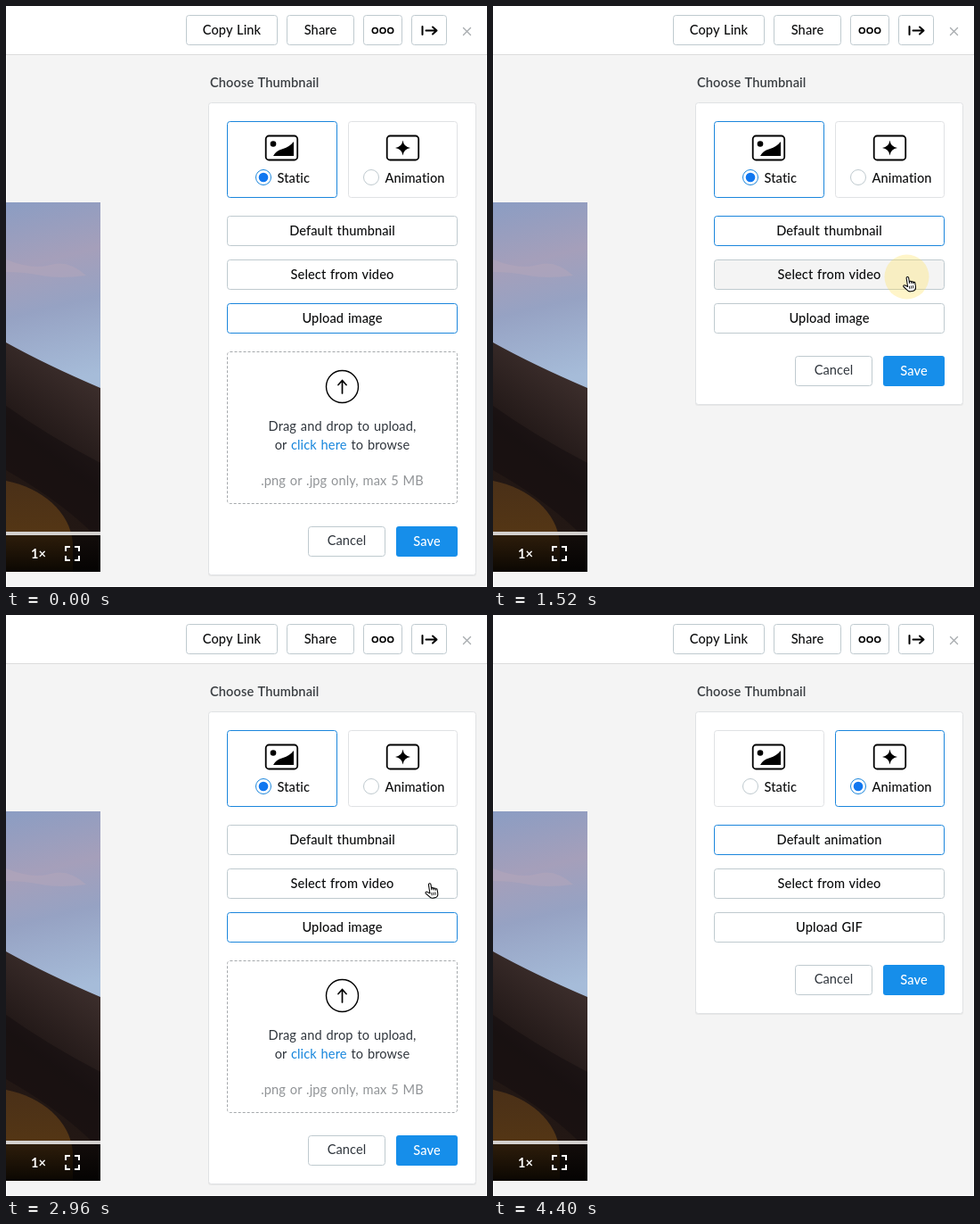
An HTML page for the animation above (4.56 s loop, 540 by 651 pixels).

```html
<!DOCTYPE html>
<html lang="en">
<head>
<meta charset="utf-8">
<style>
  html, body { margin: 0; width: 100%; height: 100%; overflow: hidden; background: #fff; }
  svg { display: block; }
  text { font: 500 14.6px Lato, sans-serif; letter-spacing: .1px; word-spacing: 1px; fill: #0c0d0e; }
  .mid { text-anchor: middle; }
  .body { font-weight: 400; fill: #30363d; }
  .hint { font-weight: 400; fill: #919497; }
  .box { fill: #fff; stroke: #bfcacf; }
  .card { stroke: #e0e2e4; }
  .on { stroke: #1b86dc; }
  .hover { fill: #f4f4f4; }
  .ink { fill: none; stroke: #000; stroke-linecap: round; stroke-linejoin: round; }
</style>
</head>
<body>
<svg width="540" height="651" viewBox="0 0 540 651">
  <defs>
    <linearGradient id="sky" x1="0" y1="0" x2=".12" y2="1">
      <stop offset="0" stop-color="#8b9dc3"/>
      <stop offset=".35" stop-color="#a59fba"/>
      <stop offset=".6" stop-color="#96a2c3"/>
      <stop offset="1" stop-color="#a6bcd9"/>
    </linearGradient>
    <linearGradient id="dune" x1=".3" y1="0" x2="0" y2="1">
      <stop offset="0" stop-color="#3b2d2b"/>
      <stop offset=".4" stop-color="#1f1615"/>
      <stop offset="1" stop-color="#291a12"/>
    </linearGradient>
    <linearGradient id="glow" x1="0" y1="0" x2="0" y2="1">
      <stop offset="0" stop-color="#4a3018"/>
      <stop offset="1" stop-color="#5b3a12"/>
    </linearGradient>
    <linearGradient id="bar" x1="0" y1="0" x2="0" y2="1">
      <stop offset="0" stop-color="#000" stop-opacity=".45"/>
      <stop offset="1" stop-color="#000" stop-opacity=".88"/>
    </linearGradient>
    <clipPath id="screen"><path d="M0 220h106v414H0z"/></clipPath>
    <path id="hand" d="M11 25V4a2.8 2.8 0 0 1 5.6 0v13v-2a2.4 2.4 0 0 1 4.8 0v3v-1.5a2.2 2.2 0 0 1 4.4 0v3v-1a2.1 2.1 0 0 1 4.2 0v9c0 6-4 10-10 10h-4c-4 0-6-2-8-5L1.2 24c-2-3 2-5.5 4.3-3z"/>
  </defs>

  <path fill="#f4f4f4" d="M1 55h538v595H1z"/>
  <path stroke="#dcdcdc" d="M0 54.5h540"/>

  <g clip-path="url(#screen)">
    <path fill="url(#sky)" d="M0 220h106v214H0z"/>
    <path fill="#b9a7b8" opacity=".4" d="M0 284Q30 296 50 290T90 302Q60 306 40 302T0 298z"/>
    <path fill="url(#dune)" d="M0 377Q45 402 106 428V634H0z"/>
    <path fill="#120d0e" opacity=".5" d="M0 448Q48 482 106 512V600Q70 560 0 520z"/>
    <path fill="url(#glow)" d="M0 532C40 540 72 566 75 602V634H0z"/>
    <path fill="url(#bar)" d="M0 591h106v43H0z"/>
    <path fill="#d3d0ce" d="M0 589h106v4H0z"/>
  </g>
  <text x="28" y="619" style="fill:#fff;font-weight:700">1×</text>
  <path fill="none" stroke="#fff" stroke-width="2" d="M67 611v-5h5M77 606h5v5M82 616v5h-5M72 621h-5v-5"/>

  <g id="header"></g>
  <g class="ink" stroke-width="1.6">
    <circle cx="414.3" cy="27.5" r="3"/><circle cx="423" cy="27.5" r="3"/><circle cx="431.7" cy="27.5" r="3"/>
    <path stroke-width="2" d="M467.5 23v9M471.5 27.500h11.500M479 23.500l4.500 4l-4.500 4"/>
    <path stroke="#a9adb0" stroke-width="1.4" d="M513.500 24.500l8 8m0-8l-8 8"/>
  </g>
  <text x="229" y="91" style="font-weight:600;fill:#3b3f43">Choose Thumbnail</text>
  <g id="panel"></g>
  <circle id="pulse" fill="#fddc4c"/>
  <g id="cursor">
    <g transform="rotate(-9) scale(.46) translate(-15 -19)" stroke="#000" stroke-width="2.300" stroke-linejoin="round">
      <use href="#hand" fill="#fff"/>
      <path d="M15 24v7M19.500 24v7M24 24v7" stroke-width="1.800"/>
    </g>
  </g>
</svg>

<script>
const LOOP = 4560, STEP = 80, MOVE = 560;
const $ = id => document.getElementById(id);

const box = (x, y, w, h, cls = "") =>
  `<rect class="box ${cls}" x="${x + .5}" y="${y + .5}" width="${w - 1}" height="${h - 1}" rx="3"/>`;
const label = (text, x, y, cls = "") => `<text class="mid ${cls}" x="${x}" y="${y}">${text}</text>`;

const radio = (x, on) => `<circle class="box ${on ? "on" : ""}" cx="${x}" cy="192" r="8.5"/>` +
  (on ? `<circle cx="${x}" cy="192" r="5.3" fill="#1077f0"/>` : "");

const card = (x, w, iconX, radioX, text, on) =>
  box(x, 129, w, 86, on ? "on" : "card") + radio(radioX, on) +
  `<rect class="ink" stroke-width="1.8" x="${iconX}" y="145.500" width="35.500" height="27" rx="3.500"/>` +
  `<text x="${radioX + 15.5}" y="198">${text}</text>`;

const extras = {
  default: "",
  select: `<use href="#hand" class="ink" stroke-width="1.700" transform="translate(363 407)"/>` +
    label("Select any frame from the video to", 377.5, 483, "body") +
    label("generate a thumbnail", 377.5, 503, "body"),
  upload: `<rect x="248.500" y="387.500" width="258" height="170" rx="3" fill="none" stroke="#a4a8ab" stroke-dasharray="3 2"/>
    <g class="ink" stroke-width="1.400"><circle cx="377.500" cy="426.500" r="18"/>
    <path stroke-width="1.700" d="M377.500 434v-14M373 424.500l4.500-5l4.500 5"/></g>` +
    label("Drag and drop to upload,", 377.5, 476, "body") +
    label('or <tspan fill="#1685dc">click here</tspan> to browse', 377.5, 497, "body") +
    label(".png or .jpg only, max 5 MB", 377.5, 537, "hint"),
};
const modes = ["default", "select", "upload"];
const bottoms = { default: 447, select: 598, upload: 638 };

function drawPanel(mode, animated, hovered) {
  const bottom = bottoms[mode], top = bottom - 55;
  const names = animated
    ? ["Default animation", "Select from video", "Upload GIF"]
    : ["Default thumbnail", "Select from video", "Upload image"];
  return `<rect x="227" y="109" width="301" height="${bottom - 108}" rx="3" fill="#000" opacity=".05"/>` +
    box(227, 108, 301, bottom - 108, "card") +
    card(248, 124, 291.7, 289, "Static", !animated) +
    card(384, 123, 427.7, 410, "Animation", animated) +
    `<circle cx="300" cy="154.500" r="3.300"/>
     <path d="M300 168Q303 162 311 160Q318 158 323 152V168z"/>
     <path d="M445.500 150.500Q446.500 158 454 159Q446.500 160 445.500 167.500Q444.500 160 437 159Q444.500 158 445.500 150.500z"/>` +
    names.map((name, i) => {
      const y = 235 + 49 * i;
      const cls = modes[i] === mode ? "on" : modes[i] === hovered ? "hover" : "";
      return box(248, y, 259, 34, cls) + label(name, 377.5, y + 22);
    }).join("") + extras[mode] +
    box(339, top, 87, 34) + label("Cancel", 382.5, top + 21, "body") +
    `<rect x="438" y="${top}" width="69" height="34" rx="3" fill="#168eea"/>
     <text class="mid" x="472.500" y="${top + 22}" style="fill:#fff">Save</text>`;
}

// Each move: start, duration, from, control, to
const moves = [
  [80, MOVE, [223, 690], [340, 475], [456, 260]],
  [800, MOVE, [456, 260], [461, 285], [467, 311.5]],
  [1840, 480, [467, 311.5], [467, 333], [468, 356]],
  [2880, MOVE, [468, 356], [491, 265], [473, 190]],
  [3920, MOVE, [473, 190], [348, 436], [223, 682]],
];
// Each click: start, option hovered while pressing
const clicks = [[640], [1520, "select"], [2320, "upload"], [3520]];
const pulses = [[25, .3], [27, .68], [35, .5]];

function cursorAt(t) {
  const [start, length, a, b, c] = moves.findLast(m => t >= m[0]) || moves[0];
  const u = Math.min(1, Math.max(0, (t - start) / length));
  const e = 1 - (1 - u) ** 2;
  return a.map((v, i) => v * (1 - e) ** 2 + 2 * b[i] * e * (1 - e) + c[i] * e * e);
}

function stateAt(t) {
  if (t < 800) return ["upload", false];
  if (t < 1680) return ["default", false];
  if (t < 2480) return ["select", false];
  if (t < 3680) return ["upload", false];
  return ["default", true];
}

let shown = "";
function render(now) {
  const t = Math.floor((now % LOOP) / STEP) * STEP;
  const [x, y] = cursorAt(t);
  const click = clicks.find(([start]) => t >= start && t < start + 3 * STEP);
  const phase = click ? (t - click[0]) / STEP : 0;
  const [r, alpha] = click ? pulses[phase] : [0, 0];
  const [mode, animated] = stateAt(t);
  const hovered = click && phase < 2 ? click[1] : "";

  const key = [mode, animated, hovered].join();
  if (key !== shown) {
    $("panel").innerHTML = drawPanel(mode, animated, hovered);
    shown = key;
  }
  $("cursor").setAttribute("transform", `translate(${x} ${y})`);
  const attrs = { cx: x - 2.5, cy: y - 8, r, opacity: alpha };
  for (const name in attrs) $("pulse").setAttribute(name, attrs[name]);
}

$("header").innerHTML = box(202, 10, 103, 34) + label("Copy Link", 253.5, 32) +
  box(315, 10, 76, 34) + label("Share", 353, 32) + box(401, 10, 44, 34) + box(455, 10, 40, 34);

const begin = performance.now();
function tick() {
  render(performance.now() - begin);
  requestAnimationFrame(tick);
}
tick();
</script>
</body>
</html>
```
